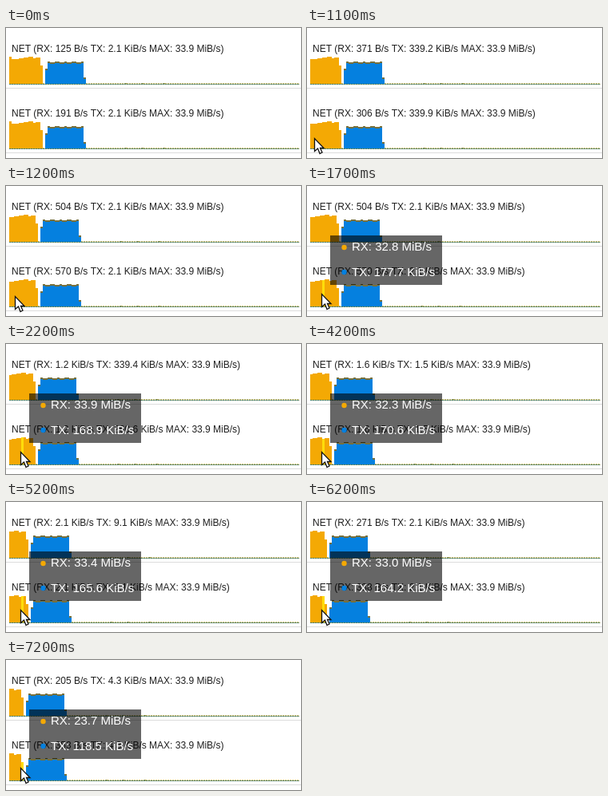
These frames come from a looping animation (369x163 px, 8000 ms). An HTML page with a canvas:

```html
<!DOCTYPE html>
<html lang="en">
<head>
<meta charset="utf-8">
<title>Network load</title>
<style>
html, body { margin: 0; width: 100%; height: 100%; overflow: hidden; background: #fff; }
canvas { display: block; }
</style>
</head>
<body>
<canvas id="stage" width="369" height="163"></canvas>
<script>
const ctx = document.getElementById('stage').getContext('2d');
const LOOP = 8000, LEFT = 4, RIGHT = 367, COL = 3, MAX = 33.9, HEIGHT = 35;
const ORANGE = '#f4a904', BLUE = '#0580df', BRIGHT = '#ffdc0a';
const FONT = '"Liberation Sans", Arial, sans-serif';

// Received MiB/s of the first columns; the sending burst follows after a gap.
const rx = [33.6, 31, 31.2, 30.8, 31.6, 32.2, 32.6, 32.8, 33.9, 33.7, 32.3, 33.4, 33, 23.7];
const BURST = 15, BURST_LEN = 17;

// One row per tick: top RX, bottom RX, top TX, bottom TX.
const titles = [
  ['125 B/s', '191 B/s', '2.1', '2.1'],
  ['371 B/s', '306 B/s', '339.2', '339.9'],
  ['504 B/s', '570 B/s', '2.1', '2.1'],
  ['1.2 KiB/s', '1.2 KiB/s', '339.4', '260.6'],
  ['968 B/s', '973 B/s', '260.4', '1.2'],
  ['1.6 KiB/s', '1.6 KiB/s', '1.5', '1.5'],
  ['2.1 KiB/s', '2.1 KiB/s', '9.1', '9.1'],
  ['271 B/s', '338 B/s', '2.1', '2.1'],
  ['205 B/s', '353 B/s', '4.3', '4.3']
];
const sent = ['177.7', '168.9', '167.5', '170.6', '165.6', '164.2', '118.5'];

// Pointer steps: time, x, y
const path = [[1000, 8, 139], [1100, 9, 138], [1200, 11, 138], [1300, 14, 138],
  [1500, 16, 137], [1600, 17, 136], [1700, 18, 135]];

const tickAt = t => t < 200 ? 0 : 1 + Math.floor((t - 200) / 1000);

function rect(color, x, y, w, h) {
  ctx.fillStyle = color;
  ctx.fillRect(x, y, w, h);
}

function text(str, x, y, size, color) {
  ctx.font = size + 'px ' + FONT;
  ctx.fillStyle = color;
  ctx.fillText(str, x, y);
}

function burstHeight(k) {
  if (k === 0) return 18;
  if (k === BURST_LEN - 1) return 7;
  return 26 + (k * 5 % 7 > 3 ? 1 : 0);
}

function chart(base, tick, active) {
  for (let x = LEFT, i = tick; x < RIGHT; x += COL, i++) {
    const w = Math.min(COL, RIGHT - x), k = i - BURST;
    if (i < rx.length) {
      const h = Math.round(rx[i] / MAX * HEIGHT);
      rect(i === active ? BRIGHT : ORANGE, x, base - h, w, h);
    } else if (k >= 0 && k < BURST_LEN) {
      const h = burstHeight(k);
      rect(BLUE, x, base - h, w, h);
      rect('#77703c', x, base - h - 2, w, 2);
    } else {
      rect('#d8c476', x, base - 2, w - 1, 1);
      if (i === 48 || i === 55 || i === 64) rect('#9a9a55', x, base - 2, w, 1);
    }
    rect('#49816b', x, base - 1, 2, 1);
    rect('#a0a77c', x + 2, base - 1, w - 2, 1);
  }
}

function panel(n, tick, active) {
  const y = n * 81, row = titles[tick];
  text(`NET (RX: ${row[n]} TX: ${row[n + 2]} KiB/s MAX: 33.9 MiB/s)`, 7, y + 30, 12, '#202020');
  chart(y + 71, tick, active);
  rect('#dcdcdc', 0, y + 75, 369, 1);
}

function dot(color, x, y) {
  ctx.fillStyle = color;
  ctx.beginPath();
  ctx.arc(x, y, 3.2, 0, Math.PI * 2);
  ctx.fill();
}

function tooltip(x, y, tick) {
  rect('rgba(0,0,0,0.6)', x, y, 140, 62);
  dot(ORANGE, x + 17.5, y + 15);
  dot(BLUE, x + 17.5, y + 46);
  text(`RX: ${rx[tick + 5].toFixed(1)} MiB/s`, x + 27, y + 19, 15, '#fff');
  text(`TX: ${sent[tick - 2]} KiB/s`, x + 27, y + 51, 15, '#fff');
}

function pointer(x, y) {
  ctx.save();
  ctx.translate(x + 0.5, y + 0.5);
  ctx.beginPath();
  [[0, 0], [0, 16], [4, 12.5], [6.5, 19], [9.5, 17.5], [7, 12], [11.5, 12]]
    .forEach(p => ctx.lineTo(p[0], p[1]));
  ctx.closePath();
  ctx.fillStyle = '#fff';
  ctx.fill();
  ctx.strokeStyle = '#111';
  ctx.lineWidth = 1.3;
  ctx.stroke();
  ctx.restore();
}

function draw(t) {
  const tick = tickAt(t), hover = t >= 1500;
  rect('#fff', 0, 0, 369, 163);
  panel(0, tick, -1);
  panel(1, tick, hover ? tick + 5 : -1);
  if (hover) {
    const lag = t < 1600 ? 2 : t < 1700 ? 1 : 0;
    tooltip(29 + lag * 2, 62 - lag, tick);
  }
  const step = path.filter(p => p[0] <= t).pop();
  if (step) pointer(step[1], step[2]);
}

const start = performance.now();
function frame() {
  draw((performance.now() - start) % LOOP);
  requestAnimationFrame(frame);
}
frame();
</script>
</body>
</html>
```
